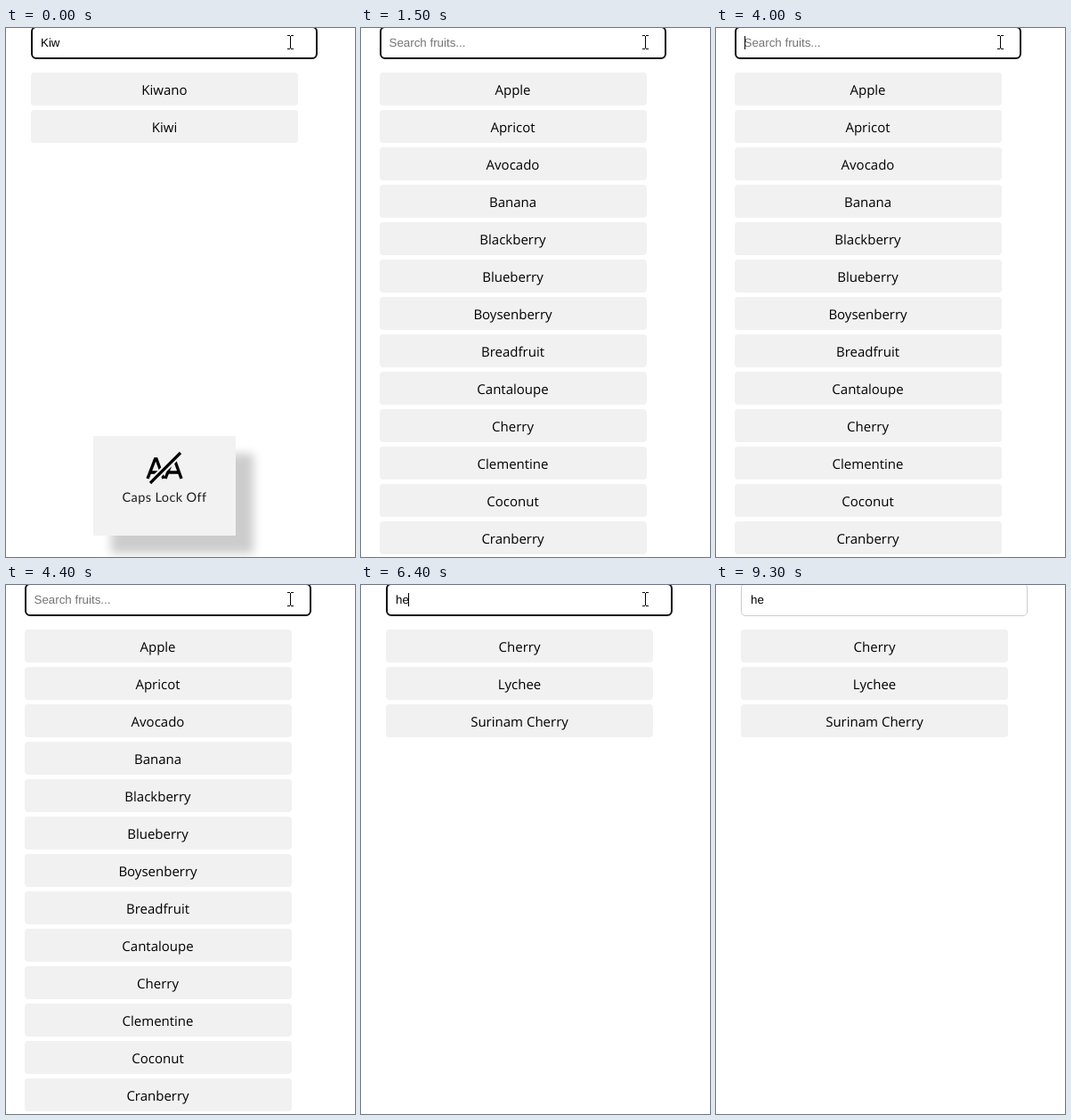
Animation, 392 px wide and 594 px high, one loop 9400 ms. Source, as an HTML page:

```html
<!DOCTYPE html>
<html lang="en">
<head>
<meta charset="utf-8">
<title>Fruit search</title>
<style>
  html, body { margin: 0; width: 100%; height: 100%; overflow: hidden; background: #fff; }
  #stage { position: relative; width: 392px; height: 594px; overflow: hidden; }
  #page { position: absolute; top: 0; left: 0; width: 392px; height: 594px; }
  #page.full { left: -7px; }
  #page.full text { transform: translateX(-.5px); }
  #field {
    position: absolute; box-sizing: border-box; left: 28px; top: -2px; width: 322px; height: 37px;
    border: 1px solid #ccc; border-radius: 5px; background: #fff;
  }
  #field.focus { border: 2px solid #101010; border-radius: 6px; }
  svg { position: absolute; left: 0; top: 0; overflow: visible; }
  text { text-rendering: geometricPrecision; }
  .row rect { fill: #f1f1f1; }
  .row text { font: 15px "Open Sans", "Noto Sans", sans-serif; text-anchor: middle; fill: #000; }
  #query { font: 13.333px "Liberation Sans", Arial, sans-serif; fill: #000; white-space: pre; }
  #query.hint { fill: #757575; }
  #toast {
    position: absolute; left: 98px; top: 458px; width: 160px; height: 112px;
    background: #f2f2f2; box-shadow: 20px 20px 10px rgba(0, 0, 0, .2);
  }
  #toast text { font: 14.5px Lato, sans-serif; letter-spacing: .4px; text-anchor: middle; fill: #1c1c1c; }
  #toast path { fill: none; stroke: #000; stroke-width: 3.4; }
  #toast .gap { stroke: #f2f2f2; stroke-width: 7.5; }
  #toast .slash { stroke-width: 3.2; }
</style>
</head>
<body>
<div id="stage">
  <div id="page">
    <div id="field"></div>
    <svg width="392" height="594">
      <g id="rows"></g>
      <text id="query" x="39" y="21"></text>
      <rect id="caret" y="9" width="1" height="15"/>
    </svg>
  </div>
  <div id="toast">
    <svg width="160" height="112">
      <path d="M61 48L69.5 26H71L79 48M64 41H76"/>
      <path d="M81 48L89.5 26H91L99 48M84 41H96"/>
      <path class="gap" d="M64 53L98 19"/>
      <path class="slash" d="M64 53L98 19"/>
      <text x="80" y="74">Caps Lock Off</text>
    </svg>
  </div>
  <svg id="mouse" width="392" height="40">
    <path d="M316 8.5H319M320 8.5H323M319.5 9V23M316 23.5H319M320 23.5H323" fill="none" stroke="#000"/>
  </svg>
</div>
<script>
const LOOP = 9400, TICK = 100, MAX_ROWS = 14;

const fruits = `Apple,Apricot,Avocado,Banana,Blackberry,Blueberry,Boysenberry,Breadfruit,
Cantaloupe,Cherry,Clementine,Coconut,Cranberry,Date,Fig,Grape,Honeydew,Huckleberry,Jackfruit,
Kiwano,Kiwi,Kumquat,Lychee,Mango,Peach,Prickly Pear,Rhubarb,Salak,Ackee,Hala Fruit,Physalis,
Surinam Cherry,White Currant`.split(",").map(s => s.trim());

// [time, typed text]
const typing = [[0, "Kiw"], [500, "Ki"], [800, "K"], [1100, ""], [1800, "k"],
  [3800, ""], [5600, "h"], [6400, "he"]];
// [time, caret visible]
const blinks = [[0, 0], [500, 1], [1500, 0], [1800, 1], [2300, 0], [2700, 1], [3200, 0],
  [3800, 1], [4300, 0], [4800, 1], [5300, 0], [5600, 1], [6000, 0], [6400, 1],
  [6900, 0], [7400, 1], [7900, 0], [8400, 1], [8700, 0]];
const BLUR = 8700;

const $ = id => document.getElementById(id);
const clamp = v => Math.min(1, Math.max(0, v));
const at = (track, t) => track.filter(k => k[0] <= t).pop()[1];

function svg(name, attrs, parent) {
  const el = document.createElementNS("http://www.w3.org/2000/svg", name);
  for (const key in attrs) el.setAttribute(key, attrs[key]);
  return parent.appendChild(el);
}

const rows = Array.from({ length: MAX_ROWS }, (_, i) => {
  const group = svg("g", { class: "row", transform: `translate(28 ${50 + 42 * i})` }, $("rows"));
  svg("rect", { width: 300, height: 37, rx: 4 }, group);
  return { group, label: svg("text", { x: 150, y: 25 }, group) };
});

let shown = null;

function search(text) {
  if (text === shown) return;
  shown = text;
  const found = fruits.filter(f => f.toLowerCase().includes(text.toLowerCase()));
  rows.forEach(({ group, label }, i) => {
    group.style.display = i < found.length ? "" : "none";
    label.textContent = found[i] || "";
  });
  // the scrollbar of the full list moves the centred page
  $("page").className = text ? "" : "full";
  $("query").textContent = text || "Search fruits...";
  $("query").setAttribute("class", text ? "" : "hint");
  const width = text ? $("query").getComputedTextLength() : 0;
  $("caret").setAttribute("x", Math.floor(39 + width));
}

function draw(now) {
  const t = Math.floor(now % LOOP / TICK) * TICK;
  search(at(typing, t));
  $("caret").style.display = at(blinks, t) ? "" : "none";
  $("field").className = t < BLUR ? "focus" : "";
  $("toast").style.opacity = clamp((1400 - t) / 300);
  const leave = clamp((t - 7500) / 600);
  $("mouse").style.transform = `translateY(${-28 * leave * leave}px)`;
}

const start = performance.now();
function loop() {
  draw(performance.now() - start);
  requestAnimationFrame(loop);
}
loop();
</script>
</body>
</html>
```
